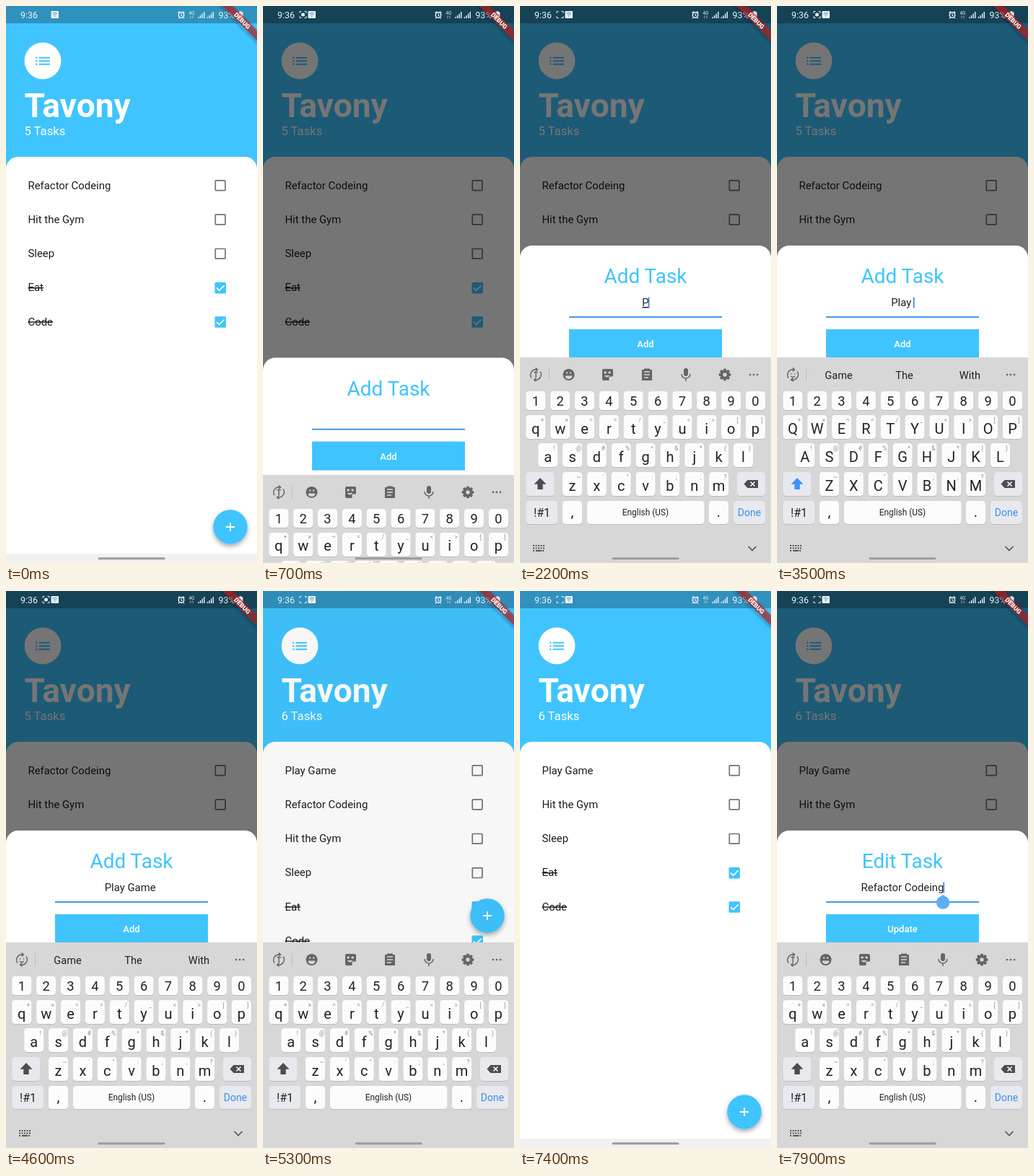
An HTML page that plays this animation: 348x772 px, repeating every 8 s.

```html
<!DOCTYPE html>
<html lang="en">
<head>
<meta charset="utf-8">
<title>Task list</title>
<style>
  html, body { margin: 0; width: 100%; height: 100%; overflow: hidden; background: #fff; }
  svg { display: block; width: 100vw; height: 100vh; font-family: Roboto, Arial, sans-serif; }
  text { white-space: pre; }
  .mid { text-anchor: middle; }
</style>
</head>
<body>
<svg id="stage" viewBox="0 0 348 772">
  <defs>
    <filter id="shadow" x="-50%" y="-50%" width="200%" height="200%">
      <feDropShadow dx="0" dy="3" stdDeviation="3" flood-opacity=".35"/>
    </filter>
  </defs>

  <rect width="348" height="772" fill="#40c4ff"/>
  <rect width="348" height="24" fill="#000" opacity=".26"/>
  <circle cx="51" cy="76" r="25.4" fill="#fff"/>
  <path d="M41 71.7h2.4m2.2 0h15.4M41 76.2h2.4m2.2 0h15.4M41 80.7h2.4m2.2 0h15.4" stroke="#40c4ff" stroke-width="2"/>
  <text x="25.4" y="153.5" font-size="46.2" font-weight="700" fill="#fff">Tavony</text>
  <text id="count" x="25.4" y="179" font-size="16.7" fill="#fff"></text>
  <path d="M0 772V226a17 17 0 0 1 17-17H331a17 17 0 0 1 17 17V772z" fill="#fff"/>
  <g id="rows"></g>
  <g id="fab">
    <circle cx="311" r="23.8" fill="#40c4ff" filter="url(#shadow)"/>
    <path d="M305 0h12m-6-6v12" stroke="#fff" stroke-width="1.8"/>
  </g>
  <rect y="759" width="348" height="13" fill="#f1f1f1"/>
  <rect id="barrier" width="348" height="772"/>

  <g id="sheet">
    <path d="M0 450V17A17 17 0 0 1 17 0H331a17 17 0 0 1 17 17V450z" fill="#fff"/>
    <text id="heading" class="mid" x="174" y="52" font-size="27.9" fill="#40c4ff"></text>
    <text id="field" y="84" font-size="14.9" fill="#222"></text>
    <rect x="68" y="98.2" width="212" height="1.8" fill="#2d8fe8"/>
    <rect x="68" y="116" width="212" height="40" fill="#40c4ff"/>
    <text id="button" class="mid" x="174" y="141.3" font-size="13" font-weight="500" fill="#fff"></text>
    <rect id="cursor" y="71.5" width="1.7" height="15" fill="#3f83dd"/>
    <path id="handle" d="M0 89L6.6 93.2A9.3 9.3 0 1 1-6.6 93.2z" fill="#5eaef5"/>
  </g>

  <g id="keyboard"></g>
  <rect x="127.500" y="764.2" width="93" height="3" rx="1.5" fill="#9c9c9c"/>

  <g id="status" fill="#e9f2f7" font-size="12.4">
    <text x="20" y="17">9:36</text>
    <path id="frameMark" d="M51 10V7.500h2.500M57.500 7.500H60V10M60 14v2.500h-2.500M53.500 16.500H51V14" fill="none" stroke="#e9f2f7"/>
    <rect id="recMark" x="53.200" y="9.700" width="4.600" height="4.600" rx="1"/>
    <rect x="62.500" y="7" width="10.500" height="10" rx="1"/>
    <path d="M64.500 10.500q3.250-2.400 6.500 0M66 12.500q1.750-1.300 3.500 0M67.200 14.500h1.200" fill="none" stroke="#4c87a3" stroke-width="1"/>
    <circle cx="243" cy="12.500" r="3.700" fill="none" stroke="#e9f2f7" stroke-width="1.500"/>
    <path d="M243 10.500v2.300l1.600 1M238.500 9.500l2.500-2M247.500 9.500l-2.500-2M240 16l-1 1.300M246 16l1 1.300" fill="none" stroke="#e9f2f7" stroke-width="1.200"/>
    <text x="253.500" y="11.500" font-size="6.300">4G</text>
    <path d="M256 17v-3.500M259 13.500V17" stroke="#e9f2f7" stroke-width=".8" stroke-dasharray="1.500 .6"/>
    <path d="M267 17v-2m2.600 2v-4m2.600 4v-6.500m2.600 6.500v-9M279.500 17v-2m2.600 2v-4m2.600 4v-6.500m2.600 6.500v-9" stroke="#e9f2f7" stroke-width="1.400"/>
    <text x="294.500" y="17">93%</text>
    <path d="M321.500 8.500h2v-1.200h3v1.200h2V18h-7z"/>
  </g>
  <g transform="translate(348 0) rotate(45)">
    <rect x="-40" y="23.700" width="80" height="10.200" fill="#b71c1c" fill-opacity=".66" filter="url(#shadow)"/>
    <text class="mid" y="32" font-size="8.700" font-weight="900" fill="#fff">DEBUG</text>
  </g>
</svg>

<script>
const LOOP = 8000, ROW = 47.3, KEY_PITCH = 33.85;
const $ = id => document.getElementById(id);
const show = (node, on) => node.setAttribute('visibility', on ? 'visible' : 'hidden');
const move = (node, x, y) => node.setAttribute('transform', `translate(${x} ${y})`);
const setText = (node, value) => { if (node.textContent !== value) node.textContent = value; };
const ramp = (t, from, to) => Math.min(1, Math.max(0, (t - from) / (to - from)));
const easeOut = p => 1 - (1 - p) ** 3;
const easeInOut = p => p * p * (3 - 2 * p);

const tasks = ['Play Game', 'Refactor Codeing', 'Hit the Gym', 'Sleep', 'Eat', 'Code'];
$('rows').innerHTML = tasks.map((name, i) => {
  const done = i > 3;
  const box = done
    ? '<rect x="289.500" y="-7.500" width="15.500" height="15.500" rx="1.500" fill="#40c4ff"/><path d="M292 .3l3.600 3.600 7-7" fill="none" stroke="#fff" stroke-width="1.700"/>'
    : '<rect x="290.300" y="-6.600" width="13.700" height="13.700" rx=".8" fill="none" stroke="#737373" stroke-width="1.700"/>';
  return `<g><text x="30.500" y="5" font-size="14.900" fill="#1d1d1d"${done ? ' text-decoration="line-through"' : ''}>${name}</text>${box}</g>`;
}).join('');
const rows = [...$('rows').children];

// Keyboard
const label = (x, y, size, value, fill = '#222', extra = '') =>
  `<text class="mid" x="${x}" y="${y}" font-size="${size}" fill="${fill}" ${extra}>${value}</text>`;
const cap = (x, y, w, h = 33, fill = '#fcfcfc') =>
  `<rect x="${x}" y="${y + 1}" width="${w}" height="${h}" rx="4.500" fill="#bcbcbc"/>` +
  `<rect x="${x}" y="${y}" width="${w}" height="${h}" rx="4.500" fill="${fill}"/>`;
const escapeMark = c => c === '<' ? '&lt;' : c === '>' ? '&gt;' : c;

function keyRow(left, top, keys, marks) {
  return [...keys].map((key, i) => {
    const x = left + i * KEY_PITCH;
    return cap(x, top, 27) + label(x + 13.5, top + 25.5, 20, key, '#222', 'data-key') +
      label(x + 22.5, top + 9.5, 8.5, escapeMark(marks[i]), '#929292');
  }).join('');
}

const numberRow = [...'1234567890'].map((n, i) => {
  const x = 8.3 + i * KEY_PITCH;
  return cap(x, 534, 27, 26) + label(x + 13.5, 553.7, 18.3, n);
}).join('');

const gearTeeth = Array.from({ length: 8 }, (_, i) =>
  `<rect x="-2" y="-8.300" width="4" height="4" rx="1" transform="rotate(${i * 45})"/>`).join('');

const toolbar = `<g id="tools" fill="#656565">
  ${label(22, 515, 10, 'T', '#656565', 'font-weight="700"')}
  <circle cx="67.500" cy="511" r="8"/>
  <path d="M62.500 512.500a5 4.500 0 0 0 10 0zM64 507.500h2.200v2H64zM69 507.500h2.200v2H69z" fill="#d7d7d7"/>
  <path d="M116 503h11a2 2 0 0 1 2 2v8l-6 6h-7a2 2 0 0 1-2-2v-12a2 2 0 0 1 2-2z"/>
  <path d="M117 507h2.200v2H117zM123 507h2.200v2H123zM117 512q4 4 7 0M124 519v-5h5" fill="#d7d7d7" stroke="#d7d7d7" stroke-width=".9"/>
  <path d="M169 504h3v-1.500h8v1.500h3v15h-14z"/>
  <path d="M172 507h8M172 511h8M172 515h6" stroke="#d7d7d7" stroke-width="1.500"/>
  <rect x="227" y="502" width="6" height="11" rx="3"/>
  <path d="M224 510a6 6 0 0 0 12 0M230 516v4" fill="none" stroke="#656565" stroke-width="1.500"/>
  <g transform="translate(284 511)"><circle r="6.300"/>${gearTeeth}<circle r="2.700" fill="#d7d7d7"/></g>
</g>
<g id="words">
  <path d="M19.500 509v1.500M24.500 509v1.500M19 513q3 3 6 0" fill="none" stroke="#656565" stroke-width="1.400"/>
  ${['Game', 'The', 'With'].map((w, i) => label(85.5 + i * 91, 516.8, 14.6, w)).join('')}
</g>
<path d="M16 515.500a7.500 7.500 0 0 1 8-11.500M28 506.500a7.500 7.500 0 0 1-8 11.500M21.500 501.500l3 2.500-3 2.500M22.500 515.500l-3 2.500 3 2.500" fill="none" stroke="#656565" stroke-width="1.400"/>
<path d="M40.500 502v18" stroke="#bdbdbd"/>
<path d="M319 511h.1M324 511h.1M329 511h.1" stroke="#656565" stroke-width="2.700" stroke-linecap="round"/>`;

$('keyboard').innerHTML = `<rect y="487" width="348" height="300" fill="#d7d7d7"/>${toolbar}${numberRow}` +
  keyRow(8.3, 567, 'qwertyuiop', '+×÷=/_<>[]') +
  keyRow(25.2, 606, 'asdfghjkl', '!@#%^&*()'.replace('&', '^').replace('^^', '^&')) +
  cap(8.3, 646, 39, 33, '#e8e9ee') +
  '<path id="shift" d="M28 654l8.500 8.800h-4.800v7.200h-7.400v-7.200h-4.800z"/>' +
  keyRow(59, 646, 'zxcvbnm', "~'\":;,?".replace('"', '"')) +
  cap(301, 646, 39, 33, '#e8e9ee') +
  `<path d="M310.500 662.500l5-5.500H330v11h-14.500z" fill="#4d4d4d"/>
   <path d="M319.500 659.500l6 6m0-6l-6 6" stroke="#fff" stroke-width="1.500"/>` +
  cap(8.3, 686, 44, 32, '#e8e9ee') + label(30.5, 707.5, 16, '!#1') +
  cap(59, 686, 27, 32) + label(72.5, 708, 20, ',') +
  cap(93, 686, 162.5, 32) + label(174, 706.3, 11.9, 'English (US)') +
  cap(262, 686, 27, 32) + label(275.5, 708, 20, '.') +
  cap(296, 686, 44, 32, '#e8e9ee') + label(318, 706.5, 14, 'Done', '#3c8eea') +
  `<g id="navIcons" fill="none" stroke="#555">
    <path d="M18 748h16M18 751.500h16M18 755h2.500M31 755h3" stroke-width="2" stroke-dasharray="2 1.500"/>
    <path d="M22 755h8" stroke-width="2"/>
    <path d="M316.500 749l5.500 5.500 5.500-5.500" stroke-width="1.600"/>
  </g>`;
const letters = [...document.querySelectorAll('[data-key]')];

const typing = [[0, ''], [2100, 'P'], [2500, 'Pl'], [2700, 'Pla'], [2900, 'Play'],
  [3300, 'Play '], [4000, 'Play Game '], [7450, 'Refactor Codeing']];

function drawField(t) {
  const [since, value] = typing.filter(([at]) => at <= t).pop();
  const field = $('field');
  setText(field, value);
  const width = value ? field.getComputedTextLength() : 0;
  field.setAttribute('x', 174 - width / 2);
  field.setAttribute('text-decoration', t >= 2100 && t < 3300 ? 'underline' : 'none');
  const blinkStart = t >= 7450 ? 7700 : Math.max(900, since);
  const open = (t >= 900 && t < 5100) || t >= 7700;
  show($('cursor'), open && (t - blinkStart) % 1000 < 500);
  $('cursor').setAttribute('x', 173 + width / 2);
  show($('handle'), t >= 7700);
  move($('handle'), 173.5 + width / 2 - .8, 0);
}

function draw(t) {
  const editing = t >= 7400, added = t >= 5100;
  const opened = editing ? ramp(t, 7420, 7640) : ramp(t, 450, 720) - ramp(t, 5050, 5280);
  const raised = editing ? easeOut(ramp(t, 7480, 7700))
    : easeOut(ramp(t, 650, 950)) - easeInOut(ramp(t, 5310, 5490));
  const shade = editing ? opened : ramp(t, 450, 700) - ramp(t, 5070, 5315);
  const inset = 272 * raised;

  setText($('count'), added ? '6 Tasks' : '5 Tasks');
  const swipe = easeInOut(ramp(t, 6680, 7020));
  const collapse = easeInOut(ramp(t, 7020, 7340));
  rows.forEach((row, i) => {
    const slot = i - (added ? 0 : 1) - (i > 1 ? collapse : 0);
    move(row, i === 1 ? 348 * swipe : 0, 248.5 + ROW * slot);
    show(row, i === 0 ? added : i !== 1 || swipe < 1);
  });
  move($('fab'), 0, 722 - inset);
  $('barrier').setAttribute('opacity', .54 * shade);

  show($('sheet'), opened > 0);
  move($('sheet'), 0, 760 - inset - 156 * easeOut(opened));
  setText($('heading'), editing ? 'Edit Task' : 'Add Task');
  setText($('button'), editing ? 'Update' : 'Add');
  drawField(t);
  if (opened <= 0) { show($('cursor'), false); show($('handle'), false); }

  show($('keyboard'), raised > 0);
  move($('keyboard'), 0, 285 * (1 - raised));
  $('navIcons').setAttribute('opacity', t >= 5150 && t < 7400 ? 0 : 1);
  const upper = (t >= 1500 && t < 2100) || (t >= 3300 && t < 4300);
  letters.forEach(node => {
    const key = node.textContent;
    setText(node, upper ? key.toUpperCase() : key.toLowerCase());
  });
  $('shift').setAttribute('fill', upper ? '#3d91fa' : '#4d4d4d');
  const suggesting = t >= 3300 && t < 4700;
  $('words').setAttribute('display', suggesting ? 'inline' : 'none');
  $('tools').setAttribute('display', suggesting ? 'none' : 'inline');

  show($('frameMark'), t >= 100);
  show($('recMark'), t >= 450 && t < 7900 && (t - 450) % 1000 < 600);
}

const start = performance.now();
function tick() {
  draw((performance.now() - start) % LOOP);
  requestAnimationFrame(tick);
}
tick();
</script>
</body>
</html>
```
